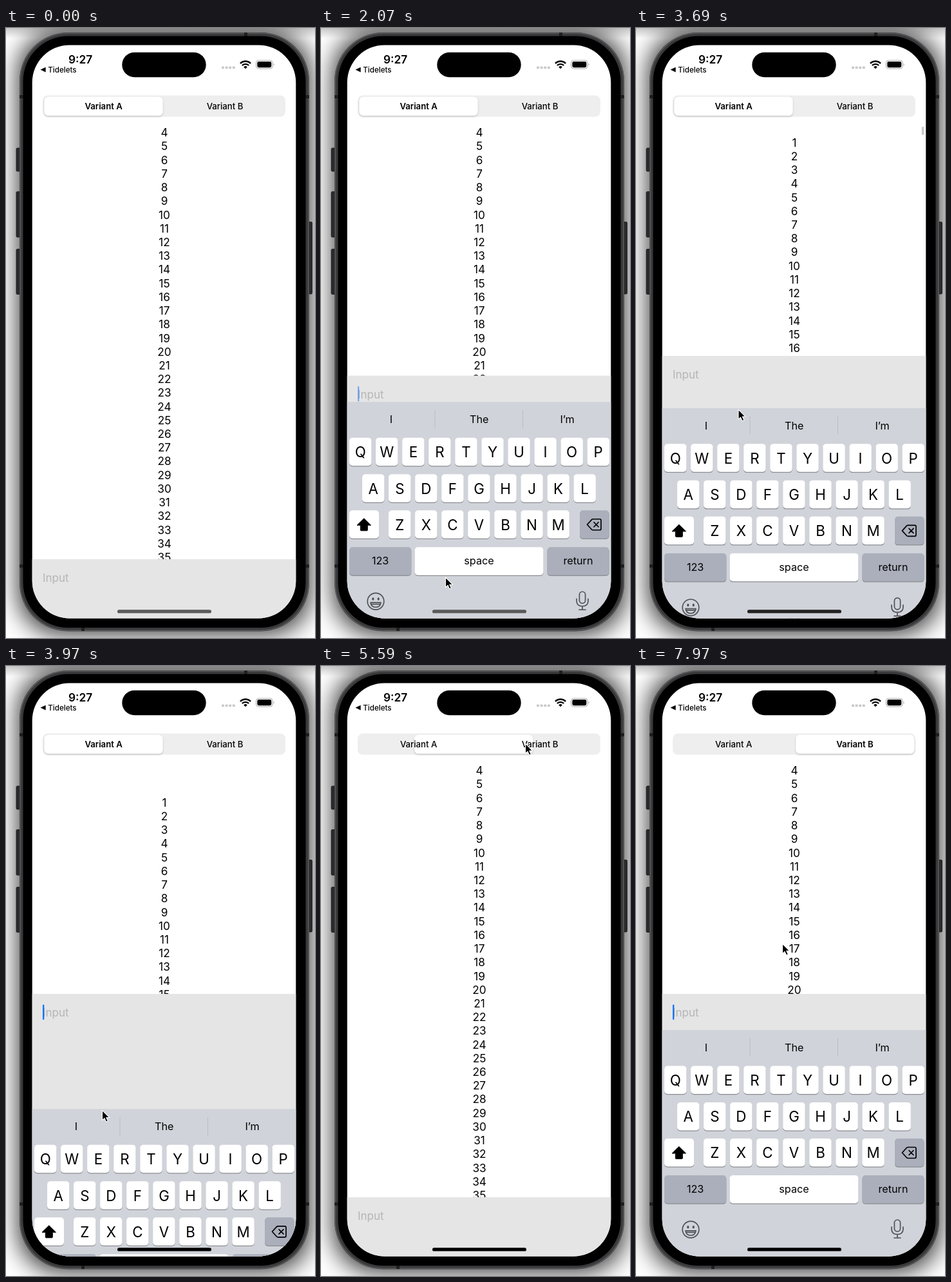
An HTML page for the animation above (8 s loop, 480 by 945 pixels).

```html
<!DOCTYPE html>
<html lang="en">
<head>
<meta charset="utf-8">
<title>Keyboard dismissal</title>
<style>
html, body { margin: 0; width: 100%; height: 100%; overflow: hidden; background: #fff; }
svg { display: block; width: 100%; height: 100%; }
text { font-family: Inter, Roboto, "Liberation Sans", sans-serif; }
.mid { text-anchor: middle; }
.num { font-size: 17.2px; }
.seg { font-size: 13.2px; font-weight: 500; }
.letter { font-size: 22.3px; }
.word { font-size: 16.2px; }
.icon { fill: none; stroke: #505257; stroke-width: 1.7; stroke-linecap: round; stroke-linejoin: round; }
</style>
</head>
<body>
<svg viewBox="0 0 480 945" preserveAspectRatio="none">
  <defs>
    <clipPath id="screen"><rect x="40.7" y="26.4" width="409.6" height="888" rx="58"/></clipPath>
    <clipPath id="listArea"><rect x="40" y="153" width="411" height="762"/></clipPath>
    <filter id="blur" x="-20%" y="-20%" width="140%" height="140%"><feGaussianBlur stdDeviation="18.5"/></filter>
    <filter id="lift" x="-10%" y="-30%" width="120%" height="170%">
      <feDropShadow dx="0" dy="1.5" stdDeviation="1.6" flood-opacity=".2"/>
    </filter>
    <linearGradient id="topShade" x2="0" y2="1">
      <stop offset="0" stop-opacity=".22"/><stop offset="1" stop-opacity="0"/>
    </linearGradient>
  </defs>

  <rect width="480" height="945" fill="#fff"/>
  <rect x="19" y="5" width="454" height="934" rx="66" opacity=".8" filter="url(#blur)"/>
  <rect width="480" height="16" fill="url(#topShade)"/>

  <!-- phone body -->
  <g fill="#2b2b2d" stroke="#151516" stroke-width=".8">
    <rect x="16" y="186" width="8" height="36" rx="1.5"/>
    <rect x="16" y="253.5" width="8" height="70.5" rx="1.5"/>
    <rect x="16" y="342.5" width="8" height="70" rx="1.5"/>
    <rect x="467.5" y="300.5" width="8" height="111.5" rx="1.5"/>
  </g>
  <rect x="21" y="7" width="450" height="927.5" rx="75" fill="#39393b"/>
  <rect x="22.2" y="8.2" width="447.6" height="925" rx="74" fill="none" stroke="#58585a" stroke-width="1.6"/>
  <g fill="#1f1f20">
    <rect x="21" y="104" width="6" height="5"/><rect x="465" y="104" width="6" height="5"/>
    <rect x="21" y="831" width="6" height="5"/><rect x="465" y="831" width="6" height="5"/>
    <rect x="370" y="7" width="5" height="6"/><rect x="117" y="929" width="5" height="5"/>
  </g>
  <rect x="26.5" y="12.5" width="439" height="916.5" rx="70" fill="#000"/>

  <g clip-path="url(#screen)">
    <rect x="40" y="26" width="411" height="889" fill="#fff"/>

    <!-- list -->
    <g clip-path="url(#listArea)"><g id="list"></g></g>
    <rect id="scroller" x="443.9" y="153" width="3.3" height="12.5" rx="1.2" fill="#969699"/>

    <!-- input bar -->
    <g id="bar">
      <rect x="40" width="411" height="420" fill="#e5e5e5"/>
      <text x="57" y="35" font-size="17" fill="#b5b5b8">Input</text>
      <rect id="caret" x="57" y="16.5" width="2.3" height="23.5" rx="1" fill="#1672fb"/>
    </g>

    <g id="keyboard"><rect x="40" width="411" height="360" fill="#d0d3d9"/></g>

    <!-- segmented control -->
    <rect x="57" y="104.5" width="377" height="33" rx="8" fill="#eeeeef"/>
    <rect id="thumb" y="106.5" width="184" height="29.3" rx="6.5" fill="#fff" filter="url(#lift)"/>
    <text id="segA" class="seg mid" x="151.6" y="126">Variant A</text>
    <text id="segB" class="seg mid" x="340" y="126">Variant B</text>

    <!-- status bar -->
    <text class="mid" x="115.6" y="55" font-size="17.3" font-weight="600">9:27</text>
    <path d="M53.5 64.6L61.6 60.8V68.4Z"/>
    <text x="65.3" y="68.8" font-size="11.6" font-weight="500">Tidelets</text>
    <rect x="180.3" y="37.7" width="130.4" height="38.5" rx="19.2"/>
    <g fill="#c9c9cb">
      <rect x="335" y="59.5" width="4" height="3.8" rx="1.2"/><rect x="340.6" y="59.5" width="4" height="3.8" rx="1.2"/>
      <rect x="346.2" y="59.5" width="4" height="3.8" rx="1.2"/><rect x="351.8" y="59.5" width="4" height="3.8" rx="1.2"/>
    </g>
    <g fill="none" stroke="#000" stroke-width="2.3">
      <path d="M363.9 54.9A11.4 11.4 0 0 1 380.1 54.9"/>
      <path d="M366.8 58A7.2 7.2 0 0 1 377.2 58"/>
    </g>
    <path d="M372 63.2L369.2 60.4A4 4 0 0 1 374.8 60.4Z"/>
    <rect x="388.5" y="50.2" width="25.6" height="12.8" rx="4" fill="none" stroke="#a5a5a7"/>
    <rect x="390.3" y="52" width="22" height="9.2" rx="2.4"/>
    <path d="M415.6 54.4Q417.6 56.6 415.6 58.8Z" fill="#a5a5a7"/>

    <rect id="home" x="173" y="901.3" width="146" height="5.2" rx="2.6"/>
  </g>

  <path id="cursor" d="M-.5 -.8V14.5L3 11.3L5.5 17L8.3 15.8L5.8 10.2H10.5Z" fill="#000" stroke="#fff" stroke-width="1.1" stroke-linejoin="round"/>
</svg>

<script>
const LOOP = 8000;
const BAR = { low: 823, high: 508 };
const KEYS = { low: 915, high: 564 };
const ROW = 21.22;
const GRAB = 3080, RELEASE = 4250, GRAB_Y = 419;
const $ = id => document.getElementById(id);

function add(parent, tag, attrs, text) {
  const el = document.createElementNS("http://www.w3.org/2000/svg", tag);
  for (const k in attrs) el.setAttribute(k, attrs[k]);
  if (text) el.textContent = text;
  parent.appendChild(el);
  return el;
}

for (let n = 1; n <= 42; n++)
  add($("list"), "text", { class: "num mid", x: 246, y: 168.2 + (n - 4) * ROW }, n);

// keyboard, laid out from its own top edge
const kb = $("keyboard");
function key(x, y, w, label, cls, fill = "#fff") {
  add(kb, "rect", { x, y: y + 1.3, width: w, height: 43.5, rx: 5, fill: "#8b8d92" });
  add(kb, "rect", { x, y, width: w, height: 43.5, rx: 5, fill });
  if (label) add(kb, "text", { class: cls + " mid", x: x + w / 2, y: y + (cls === "letter" ? 30.3 : 27) }, label);
}
const DARK = "#aaafbb";
["I", "The", "I’m"].forEach((s, i) =>
  add(kb, "text", { class: "word mid", x: 109 + i * 136.8, y: 33 }, s));
[177, 313.5].forEach(x => add(kb, "rect", { x: x - .5, y: 13, width: 1, height: 28, fill: "#babdc4" }));
[["QWERTYUIOP", 44, 55.5], ["ASDFGHJKL", 64, 112], ["ZXCVBNM", 105, 168]].forEach(([row, x, y]) =>
  [...row].forEach((c, i) => key(x + i * 41.05, y, 34.5, c, "letter")));
key(44, 168, 46, "");
key(402, 168, 45.5, "", "", DARK);
key(44, 225, 96.3, "123", "word", DARK);
key(145.5, 225, 200, "space", "word");
key(351.5, 225, 96, "return", "word", DARK);
add(kb, "path", { d: "M66.8 180.5L77.5 191H72.3V198.5Q72.3 199.5 71.3 199.5H62.3Q61.3 199.5 61.3 198.5V191H56Z",
  stroke: "#000", "stroke-width": 1, "stroke-linejoin": "round" });
add(kb, "path", { class: "icon", style: "stroke:#000",
  d: "M413.5 190L420.5 182.3Q421.3 181.5 422.3 181.5H433Q435 181.5 435 183.5V196.5Q435 198.5 433 198.5H422.3Q421.3 198.5 420.5 197.7ZM424 186.5L431 193.5M431 186.5L424 193.5" });
add(kb, "circle", { class: "icon", cx: 85, cy: 309, r: 12.8 });
[80.8, 89.2].forEach(cx => add(kb, "ellipse", { cx, cy: 305.2, rx: 1.6, ry: 2.2, fill: "#505257" }));
add(kb, "path", { class: "icon", d: "M77 310.8H93Q92 318 85 318T77 310.8ZM78.5 313.4H91.5" });
add(kb, "rect", { class: "icon", x: 401.4, y: 294, width: 9.2, height: 18, rx: 4.6 });
add(kb, "path", { class: "icon", d: "M397 305V308Q397 316.5 406 316.5T415 308V305M406 316.5V322M401 322H411" });

// pointer path: time, x, y
const PATH = [
  [690, 331, 443], [960, 296, 680], [1190, 236, 913], [1400, 194, 852],
  [2620, 194, 852], [3060, 182, 419], [3100, 182, 420], [3280, 178, 451],
  [3970, 150, 689], [4200, 148, 742], [4290, 150, 742], [4950, 314, 86],
  [5120, 314, 86], [5330, 318, 121], [5620, 318, 121], [5950, 250, 430],
  [6250, 133, 772], [6310, 130, 782], [6610, 110, 852], [6760, 110, 852],
  [6930, 145, 635], [7250, 210, 369], [7590, 210, 378], [7970, 228, 431], [8000, 229, 432]
];

function slope(i, k) {
  if (i <= 0 || i >= PATH.length - 1) return 0;
  const [a, b, c] = [PATH[i - 1], PATH[i], PATH[i + 1]];
  const l = (b[k] - a[k]) / (b[0] - a[0]), r = (c[k] - b[k]) / (c[0] - b[0]);
  return l * r <= 0 ? 0 : 2 * l * r / (l + r);
}

function pointer(t) {
  let i = 0;
  while (i < PATH.length - 2 && t > PATH[i + 1][0]) i++;
  const a = PATH[i], b = PATH[i + 1], h = b[0] - a[0];
  const u = Math.min(1, Math.max(0, (t - a[0]) / h)), v = 1 - u;
  return [1, 2].map(k =>
    a[k] * (1 + 2 * u) * v * v + slope(i, k) * h * u * v * v +
    b[k] * u * u * (3 - 2 * u) - slope(i + 1, k) * h * u * u * v);
}

const clamp = x => Math.min(1, Math.max(0, x));
const ramp = (t, from, to) => clamp((t - from) / (to - from));
const mix = (a, b, p) => a + (b - a) * p;

// progress of a critically damped spring
function spring(t, start, w = 18.26) {
  const x = Math.max(0, t - start) * w / 1000;
  return 1 - (1 + x) * Math.exp(-x);
}

function rubber(y) {
  const size = 475, pull = Math.max(0, y - GRAB_Y);
  return size * (1 - 1 / (pull * .55 / size + 1));
}

function listShift(t) {
  if (t < GRAB) return 0;
  const shift = rubber(pointer(Math.min(t, RELEASE))[1]);
  return shift * (1 - spring(t, RELEASE, 14));
}

function keyboardTop(t) {
  if (t >= 6760) return mix(KEYS.low, KEYS.high, spring(t, 6768));
  if (t < GRAB) return mix(KEYS.low, KEYS.high, spring(t, 1802));
  const held = Math.max(KEYS.high, pointer(Math.min(t, RELEASE))[1] - 3);
  return mix(held, KEYS.low, spring(t, RELEASE));
}

function barTop(t) {
  const up = t >= 6760 ? spring(t, 6798) : t < RELEASE ? spring(t, 1856) : 1 - spring(t, RELEASE + 30);
  return mix(BAR.low, BAR.high, up);
}

function caretAlpha(t) {
  const focus = t >= 6760 ? 6800 : 1860;
  if (t < focus || (t > RELEASE && t < 6760)) return 0;
  const phase = (t - focus - 190 + 1000) % 1000;
  const blink = 1 - ramp(phase, 540, 620) + ramp(phase, 820, 900);
  return t < focus + 400 ? ramp(t, focus, focus + 400) : blink;
}

function draw(t) {
  const [x, y] = pointer(t);
  const cursor = $("cursor");
  cursor.setAttribute("visibility", t < 690 ? "hidden" : "visible");
  cursor.setAttribute("transform", `translate(${x} ${y})`);
  $("list").setAttribute("transform", `translate(0 ${listShift(t)})`);
  $("bar").setAttribute("transform", `translate(0 ${barTop(t)})`);
  kb.setAttribute("transform", `translate(0 ${keyboardTop(t)})`);
  $("caret").setAttribute("opacity", caretAlpha(t));
  $("scroller").setAttribute("opacity", ramp(t, 3100, 3200) * (1 - ramp(t, 3550, 3850)));
  $("thumb").setAttribute("x", mix(59.5, 248.3, spring(t, 5507)));
  $("segA").style.fontWeight = t < 5507 ? 600 : 500;
  $("segB").style.fontWeight = t < 5680 ? 500 : 600;
  const shade = Math.round(90 * (1 - ramp(t, 3500, 3800)));
  $("home").setAttribute("fill", `rgb(${shade},${shade},${shade})`);
}

const start = performance.now();
function tick() {
  draw((performance.now() - start) % LOOP);
  requestAnimationFrame(tick);
}
tick();
</script>
</body>
</html>
```
